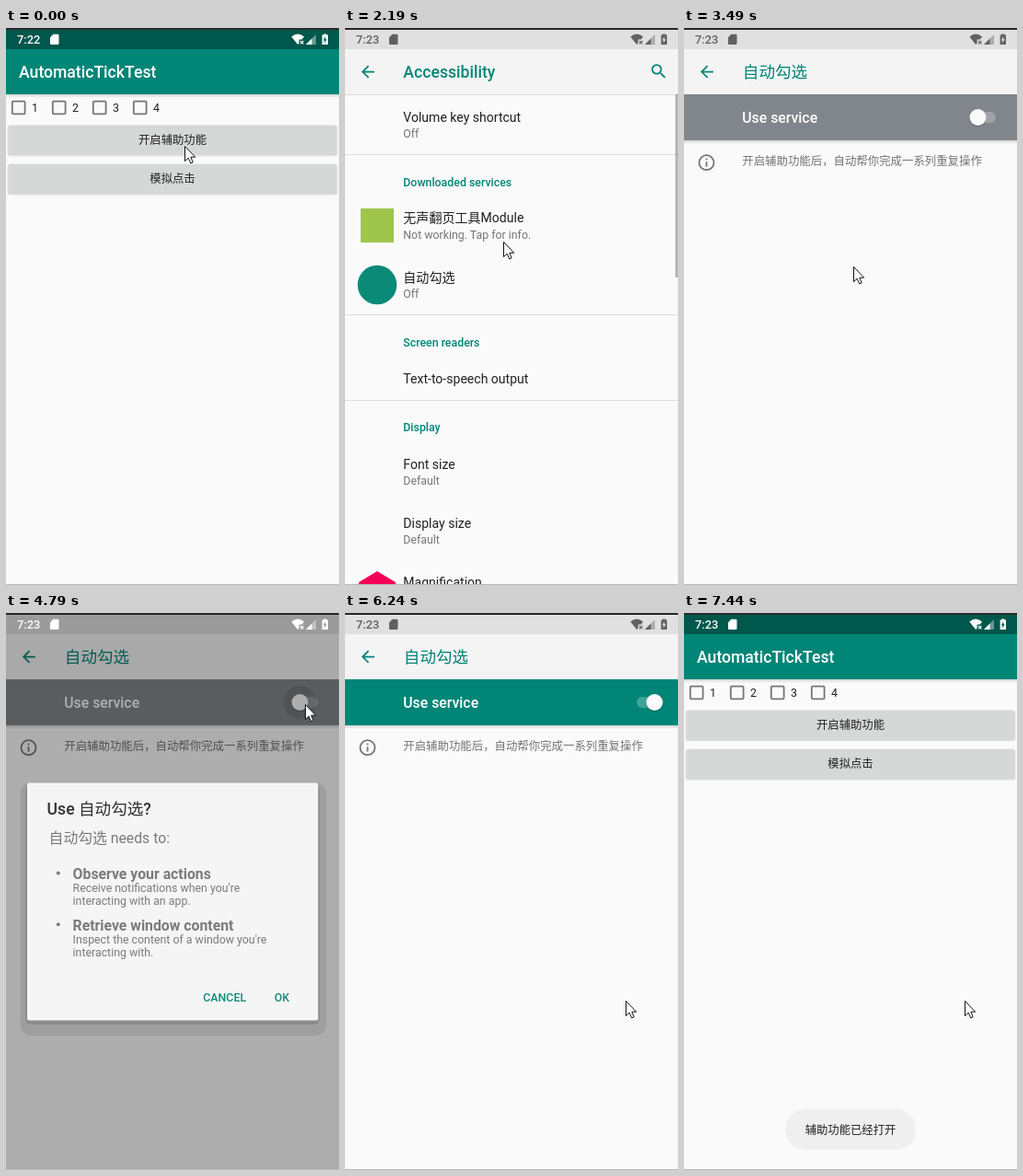
Write an HTML page that moves like this. It is 362x605 px and loops after 8000 ms.

```html
<!DOCTYPE html>
<html lang="zh-CN">
<head>
<meta charset="utf-8">
<title>Service setup</title>
<style>
html, body { margin: 0; width: 100%; height: 100%; overflow: hidden; background: #fafafa; }
svg { display: block; width: 100vw; height: 100vh; }
text { font-family: Roboto, "Noto Sans CJK SC", "Noto Sans CJK", sans-serif; white-space: pre; }
</style>
</head>
<body>
<svg id="stage" viewBox="0 0 362 605"></svg>
<script>
const W = 362, H = 605, LOOP = 8000;
const TEAL = '#008577', INK = '#212121', GREY = '#757575';
const BODY = 14.06, SMALL = 12.35, TITLE = 17.6, LARGE = 15.8;

const text = (x, y, s, size, fill = INK, weight = 400, extra = '') =>
  `<text x="${x}" y="${y}" font-size="${size}" fill="${fill}" font-weight="${weight}" ${extra}>${s}</text>`;
const rect = (x, y, w, h, fill, extra = '') =>
  `<rect x="${x}" y="${y}" width="${w}" height="${h}" fill="${fill}" ${extra}/>`;
const icon = (x, y, d, fill) =>
  `<path transform="translate(${x} ${y}) scale(.88)" d="${d}" fill="${fill}"/>`;
const shadow = y => rect(0, y, W, 4, 'url(#drop)');
const divider = y => rect(0, y, W, 1, '#dcdcdc');
const layer = (id, body) =>
  `<g id="${id}Clip" clip-path="url(#${id}Mask)"><g id="${id}">${body}</g></g>`;
const mask = id => `<clipPath id="${id}Mask"><rect id="${id}Top" width="${W}" height="${H}"/></clipPath>`;

const backArrow = icon(14.4, 37, 'M20 11H7.83l5.59-5.59L12 4l-8 8 8 8 1.41-1.41L7.83 13H20v-2z', TEAL);
const searchIcon = icon(330.5, 36.5, 'M15.5 14h-.79l-.28-.27A6.47 6.47 0 0 0 16 9.5 6.5 6.5 0 1 0 9.5 16c1.61 0 3.09-.59 4.23-1.57l.27.28v.79l5 4.99L20.49 19zm-6 0C7.01 14 5 11.99 5 9.5S7.01 5 9.5 5 14 7.01 14 9.5 11.99 14 9.5 14z', TEAL);

const checkbox = n => {
  const x = 6.8 + (n - 1) * 44;
  return rect(x, 79.6, 13.8, 13.8, 'none', `rx="1.2" stroke="${GREY}" stroke-width="1.8"`) +
    text(x + 21.2, 91, n, SMALL);
};
const button = (id, y, label) =>
  rect(1.5, y + .6, 359, 33.2, '#000', 'rx="2.5" opacity=".1"') +
  rect(2.5, y, 357, 32.6, '#d6d7d7', `id="${id}" rx="2"`) +
  text(181, y + 20.6, label, SMALL, INK, 400, 'text-anchor="middle"');

const mainScreen =
  rect(0, -20, W, 640, '#fafafa') +
  rect(0, -20, W, 44, '#00574b') +
  rect(0, 23, W, 49, TEAL) + shadow(72) +
  text(14, 54, 'AutomaticTickTest', TITLE, '#fff', 500) +
  [1, 2, 3, 4].map(checkbox).join('') +
  button('press', 105.5, '开启辅助功能') + button('second', 147.8, '模拟点击');

const settingsFrame = title =>
  rect(0, -20, W, 660, '#fafafa') +
  rect(0, -20, W, 44, '#e0e0e0') + rect(0, 23, W, 49, '#f4f4f4') +
  backArrow + title;

const row = (y, title, note) => text(63.3, y, title, BODY) + text(63.3, y + 17.3, note, SMALL, GREY);
const heading = (y, s) => text(63.3, y, s, SMALL, TEAL, 500);

const listScreen =
  settingsFrame(text(63.3, 54, 'Accessibility', TITLE, TEAL, 500)) + searchIcon +
  rect(0, 72, W, 1, '#dedede') +
  `<circle id="ripple" cx="169" cy="279" fill="#000" opacity=".09" clip-path="url(#rowMask)"/>` +
  row(101.7, 'Volume key shortcut', 'Off') + divider(137) +
  heading(171.5, 'Downloaded services') +
  rect(17, 196, 36, 37, '#9fc54d') +
  row(211.3, '无声翻页工具Module', 'Not working. Tap for info.') +
  `<circle cx="35" cy="279" r="21.3" fill="#0b8a78"/>` +
  row(275.7, '自动勾选', 'Off') + divider(311) +
  heading(345.7, 'Screen readers') +
  text(63.3, 385.7, 'Text-to-speech output', BODY) + divider(404) +
  heading(438.3, 'Display') +
  row(478.7, 'Font size', 'Default') + row(543, 'Display size', 'Default') +
  `<path d="M35 590L55 602V612H15V602Z" fill="#f50057"/>` +
  text(63.3, 607.3, 'Magnification', BODY) +
  rect(359, 72, 3, 199, '#000', 'id="scroll"');

const detailScreen =
  settingsFrame(text(63.8, 54, '自动勾选', TITLE, TEAL)) +
  rect(0, 72, W, 50, '#80868b', 'id="banner"') + shadow(122) +
  text(63.3, 103.2, 'Use service', LARGE, '#fff', 500) +
  rect(317, 91, 22, 12, '#fff', 'rx="6" opacity=".25"') +
  `<circle id="halo" cx="319.5" cy="97" r="18" fill="#000" opacity=".1"/>
   <circle id="thumbShade" cy="97.8" r="9.4" fill="#000" opacity=".18"/>
   <circle id="thumb" cy="97" r="9" fill="#fafafa"/>
   <circle cx="24.5" cy="146.2" r="8" fill="none" stroke="${GREY}" stroke-width="1.8"/>` +
  rect(23.6, 145.3, 1.8, 5.3, GREY) + rect(23.6, 141.6, 1.8, 1.8, GREY) +
  text(63.3, 149, '开启辅助功能后，自动帮你完成一系列重复操作', 12.42, GREY);

const need = (y, title, a, b) =>
  `<circle cx="56.8" cy="${y - 6.5}" r="2" fill="${GREY}"/>` +
  text(72.6, y, title, LARGE, GREY, 700) +
  text(72.6, y + 14.2, a, SMALL, GREY) + text(72.6, y + 28.4, b, SMALL, GREY);

const dialog =
  rect(15.5, 184, 333, 275, '#000', 'rx="12" opacity=".09"') +
  rect(21, 186, 320, 261, '#000', 'rx="6" opacity=".14"') +
  rect(23, 184.6, 316.3, 258, '#fff', 'rx="2"') +
  text(44.6, 219.3, 'Use 自动勾选?', TITLE, INK, 500) +
  text(46.6, 250, '自动勾选 needs to:', LARGE, GREY) +
  need(289, 'Observe your actions', "Receive notifications when you're", 'interacting with an app.') +
  need(344.8, 'Retrieve window content', "Inspect the content of a window you're", 'interacting with.') +
  text(214.3, 422, 'CANCEL', SMALL, TEAL, 500) + text(291.7, 422, 'OK', SMALL, TEAL, 500);

const statusBar =
  `<text id="clock" x="12" y="17" font-size="12.8" font-weight="500"></text>
   <path d="M51.3 6.8H56.6Q57.5 6.8 57.5 7.7V17Q57.5 17.9 56.6 17.9H49Q48 17.9 48 17V10.2Z"/>
   <path d="M310.3 9.4Q317.2 3.6 324.1 9.4L321.6 12.4H318.6V16.4L317.2 18Z"/>
   <path d="M320 14L323.4 17.4M323.4 14L320 17.4" fill="none" stroke="currentColor" stroke-width="1.1"/>
   <path d="M326 18L337 7V18Z" opacity=".4"/><path d="M326 18L332.5 11.5V18Z"/>
   <path fill-rule="evenodd" d="M345.2 6.4H348.4V7.6H350V18H343.6V7.6H345.2ZM347.3 9L344.9 13.4H346.4V16.6L348.7 12.2H347.3Z"/>`;

document.getElementById('stage').innerHTML =
  `<defs>
    <linearGradient id="drop" x1="0" y1="0" x2="0" y2="1">
      <stop stop-opacity=".16"/><stop offset="1" stop-opacity="0"/>
    </linearGradient>
    ${mask('main')}${mask('list')}${mask('detail')}
    <clipPath id="rowMask"><rect y="247" width="${W}" height="64"/></clipPath>
  </defs>` +
  layer('main', mainScreen) + layer('list', listScreen) + layer('detail', detailScreen) +
  rect(0, 0, W, H, '#000', 'id="dim"') +
  `<g id="dialog">${dialog}</g><g id="status">${statusBar}</g>` +
  rect(0, 0, W, 2, '#25282a') + rect(0, 604, W, 1, '#b8b8b8') +
  `<path id="cursor" d="M.5 .5V16.6L4.2 13.2L6.7 18.9L9.2 17.8L6.8 12.2H11.7Z" fill="#fff" stroke="#111" stroke-width="1" stroke-linejoin="round"/>`;

const el = Object.fromEntries([...document.querySelectorAll('[id]')].map(e => [e.id, e]));
const set = (id, attrs) => { for (const k in attrs) el[id].setAttribute(k, attrs[k]); };
const show = (id, on) => set(id, { display: on ? 'inline' : 'none' });

const TICKS = [0, 500, 650, 1240, 1390, 1510, 1630, 1770, 1890, 2040, 2190, 2310, 2430, 2710, 2830,
  2980, 3100, 3220, 3370, 3490, 3610, 3730, 3850, 3970, 4090, 4790, 4940, 5060, 5180, 5300,
  5450, 5570, 5690, 5970, 6120, 6240, 7050, 7170, 7320, 7440];
const PATH = [[0, 194, 128], [1770, 194, 128], [1890, 231, 138], [2040, 189, 193], [2190, 172, 232],
  [2430, 139, 281], [3220, 139, 281], [3490, 184, 259], [4090, 325, 99], [4790, 325, 99],
  [5060, 308, 200], [5300, 277, 316], [5690, 305, 421], [LOOP, 305, 421]];

const clamp = v => Math.max(0, Math.min(1, v));
const ramp = (t, a, b) => clamp((t - a) / (b - a));
const ease = p => 1 - (1 - p) ** 3;
const windowAnim = (t, start) => ease(ramp(t, start, start + 425));

function pointer(t) {
  const i = Math.max(1, PATH.findIndex(p => p[0] > t));
  const [a, b] = [PATH[i - 1], PATH[i]], k = ramp(t, a[0], b[0]);
  return [1, 2].map(n => a[n] + (b[n] - a[n]) * k);
}

function placeScreen(id, open, covered) {
  show(id + 'Clip', open > 0);
  set(id, { transform: `translate(0 ${H * (.041 * (1 - open) - .02 * covered)})` });
  set(id + 'Top', { y: H * (1 - open) });
}

function draw(time) {
  const t = TICKS.findLast(k => k <= time);
  const close = windowAnim(t, 6960);
  const list = t < 6900 ? windowAnim(t, 1310) : 0;
  const detail = windowAnim(t, 2900) * (1 - close);
  placeScreen('main', 1, Math.max(list, detail));
  placeScreen('list', list, detail);
  placeScreen('detail', detail, 0);

  set('press', { fill: t === 500 ? '#c3c4c4' : '#d6d7d7' });
  set('scroll', { opacity: .27 * (1 - ramp(t, 2190, 2430)) });
  set('ripple', { r: t < 2710 ? 0 : 100 + 64 * ramp(t, 2710, 2830) });

  const thumbX = 319.5 + 17 * ramp(t, 5900, 6200);
  set('thumb', { cx: thumbX });
  set('thumbShade', { cx: thumbX });
  set('banner', { fill: t >= 5970 ? TEAL : '#80868b' });
  show('halo', t >= 4790 && t < 5060);

  const fade = 1 - ramp(t, 5900, 6160);
  const opening = t >= 4790;
  set('dim', { opacity: opening ? (.31 + .29 * ramp(t, 4790, 5060)) * fade : 0 });
  set('dialog', { opacity: opening ? (.88 + .12 * ramp(t, 4790, 4940)) * fade : 0 });
  show('dialog', opening && fade > 0);

  const light = list < .5 && detail < .5 || opening && t < 6120;
  const tint = light ? '#fff' : '#616161';
  set('status', { fill: tint, color: tint });
  el.clock.textContent = t < 1390 ? '7:22' : '7:23';

  set('toast', { opacity: ramp(t, 7200, 7440) });
  set('cursor', { transform: `translate(${pointer(t)})` });
}

el.cursor.insertAdjacentHTML('beforebegin',
  `<g id="toast">${rect(110, 539, 142, 44, '#efefef', 'rx="22"')}${
    text(181, 566, '辅助功能已经打开', SMALL, INK, 400, 'text-anchor="middle"')}</g>`);
el.toast = document.getElementById('toast');

const start = performance.now();
function frame() {
  draw((performance.now() - start) % LOOP);
  requestAnimationFrame(frame);
}
frame();
</script>
</body>
</html>
```
